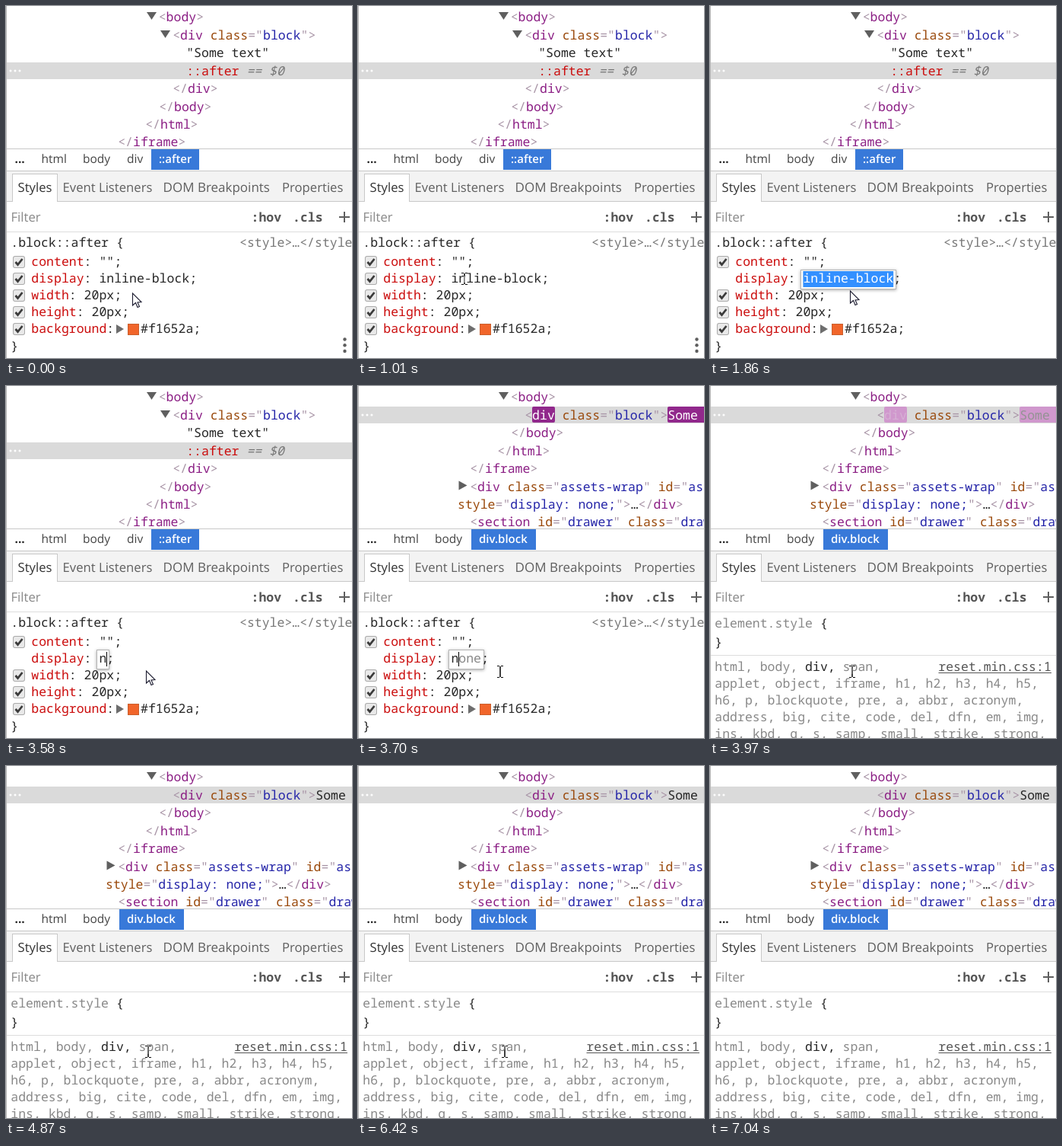
An HTML page with a canvas for the animation above (7410 ms loop, 455 by 462 pixels).

```html
<!DOCTYPE html>
<html lang="en">
<head>
<meta charset="utf-8">
<title>Inspector panel</title>
<style>
  html, body { margin: 0; width: 100%; height: 100%; overflow: hidden; background: #fff; }
  canvas { display: block; width: 455px; height: 462px; }
</style>
</head>
<body>
<canvas id="stage" width="455" height="462"></canvas>
<script>
const ctx = document.getElementById('stage').getContext('2d');
const W = 455, H = 462, LOOP = 7410;
const EDIT = 1350, TYPED = 3580, SUGGEST = 3610, REMOVED = 3700, REFRESH = 3970;

const MONO = '16.5px "Noto Sans Mono", monospace';
const TAB = '16.7px "Open Sans", sans-serif';
const CRUMB = '15.5px "Open Sans", sans-serif';
const CHAR = 9.9;
const INK = '#262626', GREY = '#888', RED = '#cb0c0c', LINE = '#c8c8c8', ICON = '#5f5f5f';
const PUNCT = '#a894a6', TAG = '#8b1e84', ATTR = '#99480a', VALUE = '#2424a8';

const clamp = v => Math.max(0, Math.min(1, v));
const mix = (a, b, p) => `rgb(${a.map((v, i) => Math.round(v + (b[i] - v) * p))})`;

function rect(x, y, w, h, color) {
  ctx.fillStyle = color;
  ctx.fillRect(x, y, w, h);
}

function rounded(x, y, w, h, r, color) {
  ctx.beginPath();
  ctx.roundRect(x, y, w, h, r);
  ctx.fillStyle = color;
  ctx.fill();
}

function dot(x, y, r, color) {
  ctx.beginPath();
  ctx.arc(x, y, r, 0, 7);
  ctx.fillStyle = color;
  ctx.fill();
}

function polygon(points, color) {
  ctx.beginPath();
  points.forEach(([x, y]) => ctx.lineTo(x, y));
  ctx.closePath();
  ctx.fillStyle = color;
  ctx.fill();
}

function text(str, x, y, color = INK, font = MONO) {
  ctx.font = font;
  ctx.fillStyle = color;
  ctx.fillText(str, x, y);
}

// Draws coloured pieces of monospaced text one after another.
function pieces(x, y, ...list) {
  for (const [str, color] of list) {
    text(str, x, y, color);
    x += str.length * CHAR;
  }
}

const TOKEN = /(<\/?|>|=|")|((?<=<\/?)\w+)|([\w-]+(?==))|((?<==")[^"]+)|(\s+|[^<>="\s]+)/g;
const TOKEN_COLORS = [PUNCT, TAG, ATTR, VALUE, INK];

function markup(x, y, source, tagColor = TAG) {
  const list = [...source.matchAll(TOKEN)].map(m => {
    const color = TOKEN_COLORS[m.slice(1).findIndex(g => g !== undefined)];
    return [m[0], color === TAG ? tagColor : color];
  });
  pieces(x, y, ...list);
}

const row = i => Math.round(20.1 + 23.48 * i);
const arrowDown = (x, y) => polygon([[x, y], [x + 13, y], [x + 6.5, y + 10]], ICON);
const arrowRight = (x, y) => polygon([[x, y], [x + 11, y + 6], [x, y + 12]], ICON);

function selectedRow(y) {
  rect(1, y, W, 22, '#dadada');
  for (const x of [6, 12, 18]) dot(x, y + 11, 1.5, '#fff');
}

// The changed element flashes purple and fades back to the row colour.
function flashedElement(t) {
  const p = (t - REMOVED) / 540;
  const start = [145, 40, 140], pale = [245, 219, 244], plain = [218, 218, 218];
  if (p < 1) {
    const color = p < .8 ? mix(start, pale, p / .8) : mix(pale, plain, (p - .8) / .2);
    rounded(229, 27, 30, 21, 2, color);
    rounded(407, 27, 60, 21, 2, color);
  }
  const white = [255, 255, 255];
  const tagFade = .7 * clamp(p) + .3 * clamp((t - 4690) / 180);
  markup(219.2, row(1), '<div class="block">', mix(white, [139, 30, 132], tagFade));
  text('Some text', 407.3, row(1), mix(white, [38, 38, 38], clamp(p)));
}

function tree(t) {
  ctx.save();
  ctx.beginPath();
  ctx.rect(0, 0, W, 187);
  ctx.clip();
  const removed = t >= REMOVED;
  selectedRow(removed ? 27 : 74);
  arrowDown(185, 8);
  markup(200.7, row(0), '<body>');
  if (removed) {
    flashedElement(t);
  } else {
    arrowDown(203, 32);
    markup(219.2, row(1), '<div class="block">');
    text('"Some text"', 237.2, row(2));
    text('::after', 237.2, row(3), RED);
    text('== $0', 316.4, row(3), '#777', 'italic ' + MONO);
    markup(219.2, row(4), '</div>');
  }
  const next = removed ? 2 : 5;
  markup(201.2, row(next), '</body>');
  markup(183.2, row(next + 1), '</html>');
  markup(147.2, row(next + 2), '</iframe>');
  if (removed) {
    arrowRight(132.5, 124.5);
    markup(147.2, row(5), '<div class="assets-wrap" id="assets">');
    markup(131, row(6), 'style="display: none;">…</div>');
    markup(147.2, row(7), '<section id="drawer" class="drawer">');
  }
  ctx.restore();
}

function toolbars(t) {
  rect(0, 187, W, 1, LINE);
  const removed = t >= REMOVED;
  if (removed) rect(149, 188, 85, 27, '#3879d9');
  else rect(191, 188, 63, 27, '#3879d9');
  text('...', 11.5, 206, INK, 'bold ' + CRUMB);
  text('html', 46.5, 206, '#444', CRUMB);
  text('body', 101, 206, '#444', CRUMB);
  if (!removed) text('div', 159, 206, '#444', CRUMB);
  text(removed ? 'div.block' : '::after', removed ? 159 : 201, 206, '#fff',
    '600 15px "Open Sans", sans-serif');

  rect(0, 216, W, 1, LINE);
  rect(0, 217, W, 39, '#f3f3f3');
  rect(0, 256, W, 1, LINE);
  rect(8, 220, 60, 36, LINE);
  rect(9, 221, 58, 36, '#fff');
  text('Styles', 15.5, 244, '#333', TAB);
  text('Event Listeners', 74.5, 244, ICON, TAB);
  text('DOM Breakpoints', 206.5, 244, ICON, '17px "Open Sans", sans-serif');
  text('Properties', 363, 244, ICON, TAB);

  text('Filter', 6.5, 283, GREY, TAB);
  text(':hov', 322.5, 283, '#555', '600 ' + MONO);
  text('.cls', 377, 283, '#555', '600 ' + MONO);
  rect(438, 276, 14, 2, ICON);
  rect(444, 270, 2, 14, ICON);
  rect(0, 296, W, 1, '#ddd');
}

function checkbox(y) {
  rounded(9, y, 16, 16, 3, '#aaa');
  rounded(10, y + 1, 14, 14, 2, '#e9e9e9');
  ctx.beginPath();
  ctx.moveTo(12.5, y + 8);
  ctx.lineTo(15.5, y + 11.5);
  ctx.lineTo(21.5, y + 4);
  ctx.strokeStyle = '#3c3c3c';
  ctx.lineWidth = 2.8;
  ctx.stroke();
}

function property(y, name, value) {
  checkbox(y - 13);
  pieces(33.3, y, [name, RED], [': ' + value + ';', INK]);
}

function editBox(width) {
  ctx.save();
  ctx.shadowColor = 'rgba(0,0,0,.35)';
  ctx.shadowBlur = 4;
  ctx.shadowOffsetY = 1;
  rect(119, 346, width, 26, '#b5b5b5');
  ctx.restore();
  rect(120, 347, width - 2, 24, '#fff');
}

function editedDisplay(t) {
  const x = 122.4, y = 363;
  pieces(33.3, y, ['display', RED], [':', INK]);
  const value = t < TYPED ? 'inline-block' : t < SUGGEST ? 'n' : 'none';
  const width = value.length * CHAR;
  editBox(Math.round(width + 7.3));
  if (t < TYPED) {
    rect(x, 348, width, 21, '#3390ff');
    text(value, x, y, '#fff');
  } else {
    pieces(x, y, ['n', INK], [value.slice(1), GREY]);
    rect(132, 349, 1, 19, '#000');
  }
  text(';', x + width, y);
}

function afterRule(t) {
  text('.block::after {', 6.3, 316);
  text('<style>…</style>', 307, 316, '#777');
  property(341, 'content', '""');
  if (t < EDIT) property(363, 'display', 'inline-block');
  else editedDisplay(t);
  property(385, 'width', '20px');
  property(407, 'height', '20px');
  checkbox(416);
  pieces(33.3, 429, ['background', RED], [':', INK]);
  polygon([[145, 418], [155, 424], [145, 430]], '#6e6e6e');
  rect(160, 417, 15, 15, '#c9602f');
  rect(161, 418, 13, 13, '#f1652a');
  text('#f1652a;', 177, 429);
  text('}', 6.3, 452);
  if (t < EDIT) for (const y of [437.5, 445.3, 453]) dot(445.5, y, 2.2, ICON);
}

function resetRule() {
  pieces(6.3, 317, ['element.style ', GREY], ['{', INK]);
  text('}', 6.3, 342);
  rect(1, 353, W, 1, '#ddd');
  pieces(6.3, 374, ['html, body, ', GREY], ['div,', INK], [' span,', GREY]);
  text('reset.min.css:1', 300.3, 374, '#555');
  rect(300.5, 376, 148.5, 1, '#555');
  [
    'applet, object, iframe, h1, h2, h3, h4, h5,',
    'h6, p, blockquote, pre, a, abbr, acronym,',
    'address, big, cite, code, del, dfn, em, img,',
    'ins, kbd, q, s, samp, small, strike, strong,'
  ].forEach((line, i) => text(line, 6.3, 396 + i * 22, GREY));
}

// Pointer path: time, x, y.
const PATH = [
  [0, 166.5, 377], [19, 166.5, 377], [20, 162, 372], [70, 154.5, 360],
  [770, 154.5, 360], [1010, 139.5, 358], [1560, 139.5, 358], [1630, 124.5, 358],
  [1800, 124.5, 358], [1860, 184.5, 374], [3699, 184.5, 374], [3700, 186.5, 375],
  [6400, 186.5, 375], [6420, 192.5, 375], [6740, 460, 418],
  [6930, 460, 457], [7040, 428, 471], [LOOP, 428, 480]
];

function pointer(t) {
  const i = PATH.findIndex(k => k[0] > t);
  const [t0, x0, y0] = PATH[i - 1], [t1, x1, y1] = PATH[i];
  const p = (t - t0) / (t1 - t0);
  const x = x0 + (x1 - x0) * p, y = y0 + (y1 - y0) * p;
  if (t < 50 || (t >= 1830 && t < REMOVED)) arrowPointer(x, y);
  else textPointer(Math.round(x), Math.round(y));
}

function arrowPointer(x, y) {
  const shape = [[0, 0], [0, 16], [4, 12.5], [6.5, 18.5], [9, 17.5], [6.5, 12], [11.5, 11.5]];
  polygon(shape.map(([dx, dy]) => [x + dx, y + dy]), '#fff');
  ctx.strokeStyle = '#1c1c30';
  ctx.lineWidth = 1.1;
  ctx.stroke();
}

function textPointer(x, y) {
  ctx.globalCompositeOperation = 'difference';
  rect(x - .75, y - 7, 1.5, 14, '#fff');
  for (const edge of [y - 8, y + 7]) {
    rect(x - 4, edge, 3, 1, '#fff');
    rect(x + 1, edge, 3, 1, '#fff');
  }
  ctx.globalCompositeOperation = 'source-over';
}

function draw(now) {
  const t = now % LOOP;
  ctx.textRendering = 'geometricPrecision';
  rect(0, 0, W, H, '#fff');
  tree(t);
  toolbars(t);
  if (t < REFRESH) afterRule(t);
  else resetRule();
  rect(0, 0, 1, H, '#b8b8b8');
  pointer(t);
}

let start;
function tick(now) {
  start ??= now;
  draw(Math.max(0, now - start));
  requestAnimationFrame(tick);
}
draw(0);
requestAnimationFrame(tick);
</script>
</body>
</html>
```
